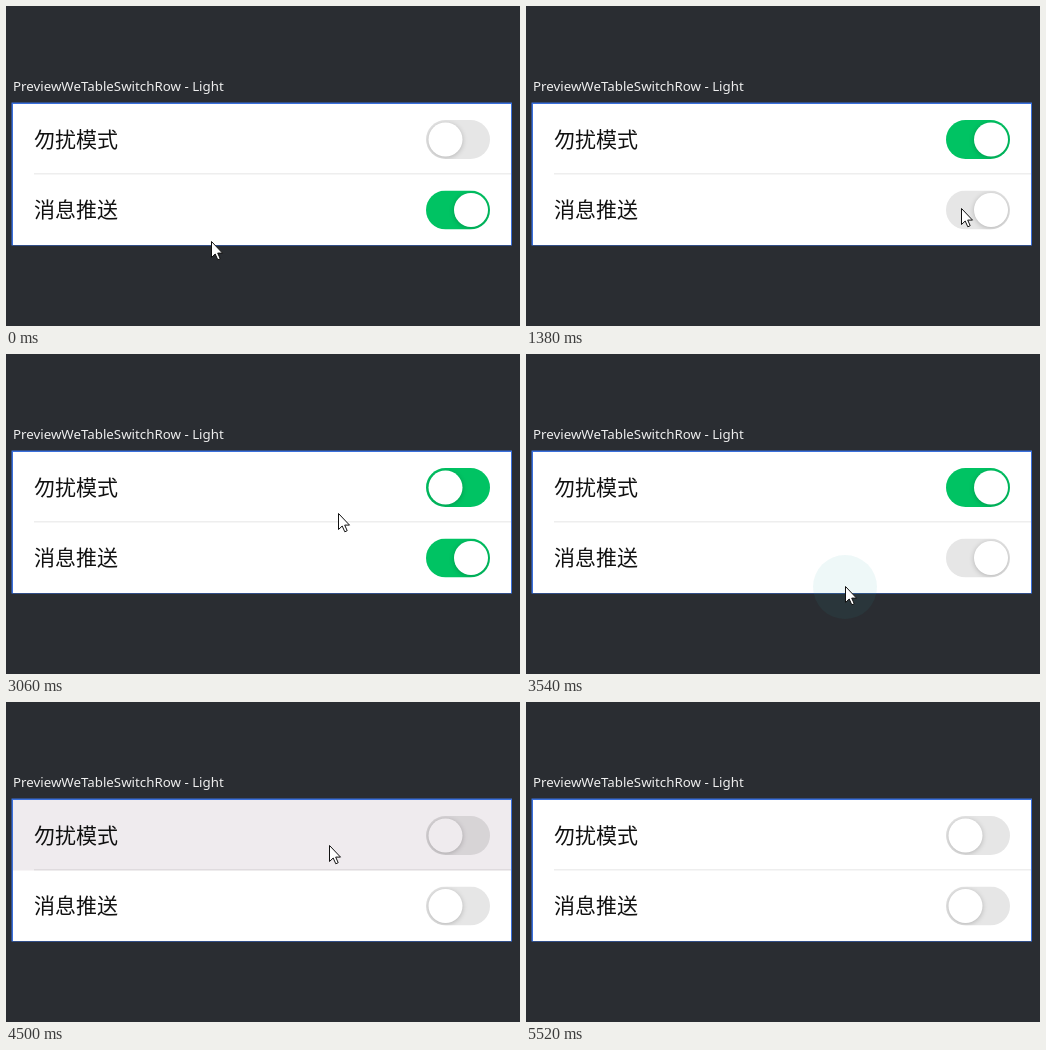
Recreate the animation shown at these times as an HTML page. Size 514 px wide and 320 px high, loop 6000 ms.

```html
<!DOCTYPE html>
<html lang="zh-CN">
<head>
<meta charset="utf-8">
<style>
  html, body { margin: 0; width: 100%; height: 100%; overflow: hidden; background: #2a2d32; }
  svg { display: block; width: 100vw; height: 100vh; }
  .title { font: 13.3px "Noto Sans", "Open Sans", sans-serif; fill: #eee; }
  .label { font: 21px "Noto Sans CJK SC", "Noto Sans CJK", sans-serif; fill: #111; }
  .knob { fill: #fff; filter: drop-shadow(0 1px 2.5px rgba(0, 0, 0, .22)); }
  .tint { fill: #efebee; mix-blend-mode: multiply; }
</style>
</head>
<body>
<svg viewBox="0 0 514 320">
  <defs>
    <clipPath id="pill"><rect x="420" y="-19.5" width="64" height="39" rx="19.5"/></clipPath>
  </defs>
  <rect width="514" height="320" fill="#2a2d32"/>
  <text class="title" x="7" y="85">PreviewWeTableSwitchRow - Light</text>
  <rect x="5.5" y="96.5" width="500.5" height="143" fill="#3a70dc"/>
  <rect x="7" y="98" width="498" height="141" fill="#fff"/>
  <rect x="28" y="167" width="477" height="1.5" fill="#eee"/>
  <g id="rows"></g>
  <circle id="ripple" fill="#2da8a6"/>
  <path id="cursor" d="M.5 .5V16.5L4.2 13L6.8 18.8L9.2 17.7L6.7 12.1H11.5Z" fill="#fff" stroke="#111"/>
</svg>
<script>
const LOOP = 6000, STEP = 60, TOP = 98, ROW_HEIGHT = 70.5, SWITCH_LEFT = 420;
const rows = [{ label: '勿扰模式', on: 0 }, { label: '消息推送', on: 1 }];

// Time and place of each tap, between the pointer's first and last position.
const path = [
  [-120, 205, 235],
  [600, 435, 130], [1200, 435, 202], [1860, 436, 122],
  [2400, 343, 211], [2880, 332, 159], [3420, 319, 232],
  [3840, 325, 140], [4500, 323, 143], [5040, 325, 140],
  [5580, 340, 330],
];
const taps = path.slice(1, -1).map(([time, x, y]) => ({
  time,
  toggle: time + 2 * STEP,
  row: Math.floor((y - TOP) / ROW_HEIGHT),
  tints: x < SWITCH_LEFT,
}));

const $ = id => document.getElementById(id);
const clamp = v => Math.min(1, Math.max(0, v));
const smooth = v => (v = clamp(v), v * v * (3 - 2 * v));
const easeOut = v => 1 - (1 - clamp(v)) ** 2;
const mix = (a, b, p) => a + (b - a) * p;

$('rows').innerHTML = rows.map(({ label }, i) => {
  const top = TOP + i * ROW_HEIGHT, mid = top + 35.5;
  return `
    <text class="label" x="28" y="${mid + 7}">${label}</text>
    <g transform="translate(0 ${mid})" clip-path="url(#pill)">
      <rect class="track" x="${SWITCH_LEFT}" y="-19.5" width="64" height="39"/>
      <circle class="knob" r="17"/>
    </g>
    <rect class="tint" x="7" y="${top}" width="498" height="${ROW_HEIGHT}"/>`;
}).join('');

const [tracks, knobs, tints] = ['track', 'knob', 'tint'].map(name => document.getElementsByClassName(name));

// The pointer leaves after a tap has ended and arrives just before the next.
function pointer(t) {
  let [, x, y] = path[0];
  for (let i = 1; i < path.length; i++) {
    const [time, nextX, nextY] = path[i];
    const leave = path[i - 1][0] + 3 * STEP, arrive = time - STEP;
    const p = easeOut((t - leave) / (arrive - leave));
    x = mix(x, nextX, p);
    y = mix(y, nextY, p);
  }
  return [x, y];
}

function drawRow(row, i, t) {
  let on = row.on, pos = on, tinted = false;
  for (const tap of taps.filter(tap => tap.row === i && t >= tap.time)) {
    if (t < tap.toggle) {
      tinted = tap.tints;
    } else {
      on = 1 - on;
      pos = mix(pos, on, smooth((t - tap.toggle - STEP) / 240));
    }
  }
  tracks[i].setAttribute('fill', on ? '#00c363' : '#e6e6e6');
  knobs[i].setAttribute('cx', mix(439.5, 465, pos));
  tints[i].style.display = tinted ? '' : 'none';
}

// A small disc shows one step into the tap, then swells as the switch flips.
function drawPointer(t) {
  const [x, y] = pointer(t);
  $('cursor').setAttribute('transform', `translate(${x} ${y})`);
  const tap = taps.find(({ time, toggle }) => t >= time + STEP && t < toggle + STEP);
  const swollen = tap && t >= tap.toggle;
  const attributes = { cx: x, cy: y + 1, r: swollen ? 32 : 17.3, opacity: !tap ? 0 : swollen ? .08 : .13 };
  for (const name in attributes) $('ripple').setAttribute(name, attributes[name]);
}

const start = performance.now();
function frame() {
  const elapsed = (performance.now() - start) % LOOP;
  const t = Math.floor(elapsed / STEP) * STEP;
  rows.forEach((row, i) => drawRow(row, i, t));
  drawPointer(t);
  requestAnimationFrame(frame);
}
frame();
</script>
</body>
</html>
```
